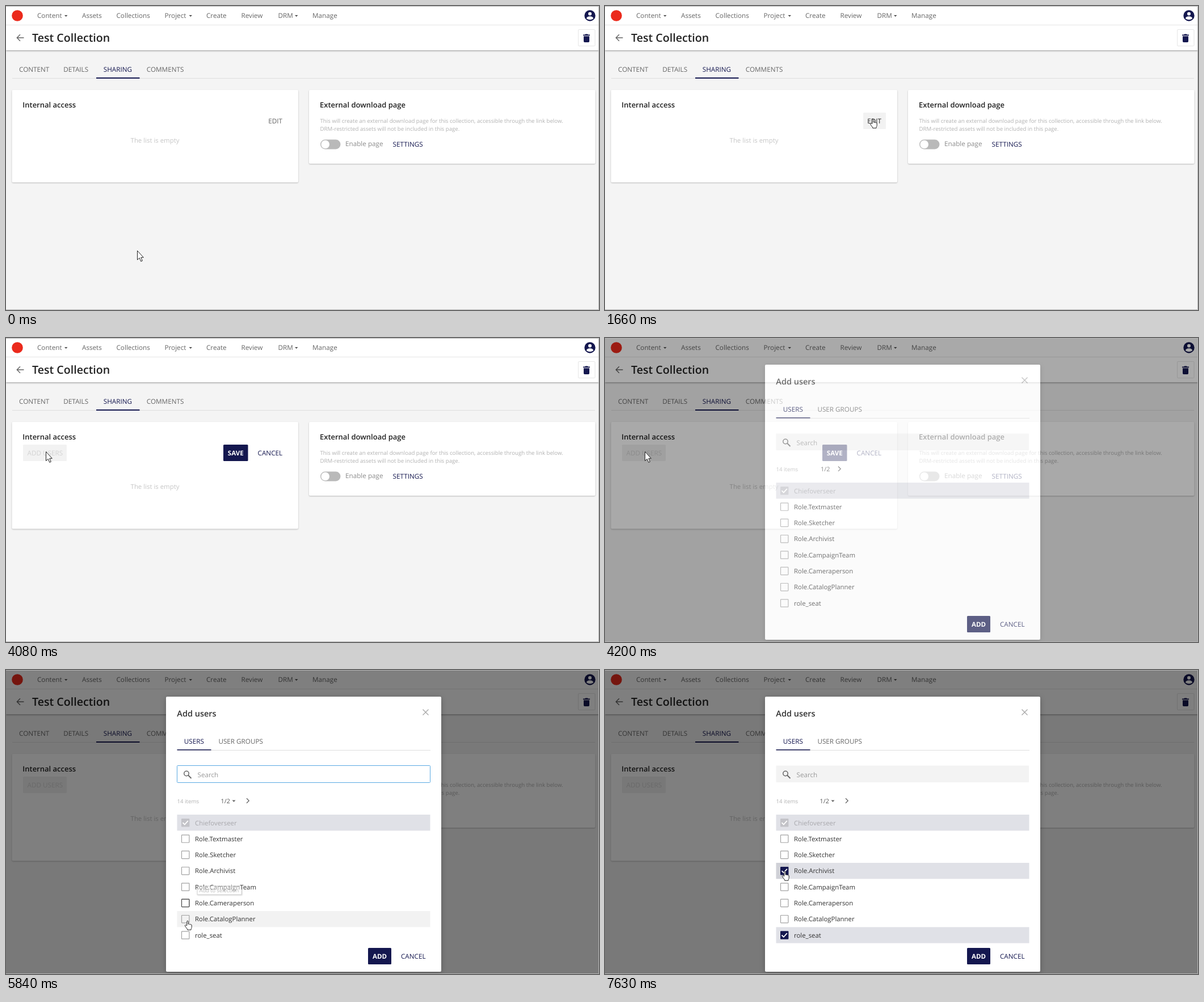
An HTML page that plays this animation: 1045x536 px, repeating every 8000 ms.

```html
<!DOCTYPE html>
<html lang="en">
<head>
<meta charset="utf-8">
<title>Collection sharing</title>
<style>
  html, body { margin: 0; width: 100%; height: 100%; overflow: hidden; background: #f4f4f4; }
  svg { display: block; width: 100vw; height: 100vh; }
  text { font: 400 11.4px "Open Sans", sans-serif; fill: #333; text-rendering: geometricPrecision; white-space: pre; }
  .label { font-size: 11.7px; font-weight: 500; fill: #666; }
  .title { font-size: 19.6px; font-weight: 600; fill: #222; }
  .head { font-size: 13px; font-weight: 600; fill: #222; }
  .modal-head { font-size: 14.5px; font-weight: 600; fill: #333; }
  .small { font-size: 9.7px; fill: #b2b2b2; }
  .faint { fill: #c6c6c6; }
  .navy { fill: #14174f; }
  .solid { font-size: 11.6px; font-weight: 700; fill: #fff; }
  .dark { fill: #222; }
  .off { fill: #d2d2d2; }
  .hover { fill: #f2f2f2; }
  .picked { fill: #e0e1e7; }
  .rule { stroke: #dedede; }
  .box { fill: none; stroke: #a2a2a2; stroke-width: 1.2; }
  .box.strong { stroke: #505050; }
  .tick { fill: none; stroke: #fff; stroke-width: 1.8; }
  .card { fill: #fff; filter: drop-shadow(0 1px 1.2px rgba(0,0,0,.24)); }
</style>
</head>
<body>
<svg viewBox="0 0 1045 536" preserveAspectRatio="none">
  <rect width="1045" height="536" fill="#f4f4f4"/>

  <!-- header -->
  <rect width="1045" height="78" fill="#fff" style="filter:drop-shadow(0 1px 1.5px rgba(0,0,0,.4))"/>
  <path d="M0 33.5H1045" stroke="#e6e6e6"/>
  <circle cx="20" cy="17" r="9.8" fill="#eb2a1c"/>
  <g id="nav"></g>
  <circle cx="1029" cy="17" r="9.7" class="navy"/>
  <circle cx="1029" cy="13.7" r="3" fill="#fff"/>
  <path d="M1023 22.2c0-5.4 12-5.4 12 0q-6 4-12 0z" fill="#fff"/>
  <path d="M31.5 56H19.5M25 50.3L19.3 56L25 61.7" fill="none" stroke="#666" stroke-width="1.4"/>
  <text class="title" x="46" y="63">Test Collection</text>
  <rect x="1008.5" y="41.5" width="29.5" height="29" rx="1.5" fill="#fff" stroke="#e6e6e6"/>
  <path class="navy" d="M1017 50.5h3.2l.8-1h4l.8 1h3.2v1.8h-12zM1018 53.3h10v9q0 1.7-1.7 1.7h-6.6q-1.7 0-1.7-1.7z"/>

  <!-- page tabs -->
  <path class="rule" d="M11 127.5H1038"/>
  <rect class="navy" x="159" y="126" width="76.5" height="2"/>
  <text class="label" x="23" y="116">CONTENT</text>
  <text class="label" x="101.3" y="116">DETAILS</text>
  <text class="label navy" x="171.8" y="116">SHARING</text>
  <text class="label" x="247.8" y="116">COMMENTS</text>

  <!-- internal access -->
  <g data-at="0-2130">
    <rect class="card" x="10.5" y="148" width="504.5" height="163" rx="2"/>
    <text class="faint" x="262.5" y="241" text-anchor="middle">The list is empty</text>
    <rect class="hover" x="455" y="188" width="40" height="29" rx="1.5" data-at="1360-2130"/>
    <text class="label" x="462.3" y="207" data-at="0-1360">EDIT</text>
    <text class="label dark" x="462.3" y="207" data-at="1360-2130">EDIT</text>
  </g>
  <g data-at="2130-8000">
    <rect class="card" x="10.5" y="148" width="504.5" height="188.5" rx="2"/>
    <text class="faint" x="262.5" y="266" text-anchor="middle">The list is empty</text>
    <rect class="hover" x="30" y="188" width="77" height="29" rx="1.5" data-at="3360-8000"/>
    <text class="label navy" x="37.6" y="207" data-at="2130-3930">ADD USERS</text>
    <text class="label off" x="37.6" y="207" data-at="3930-8000">ADD USERS</text>
    <rect class="navy" x="383" y="188" width="43.5" height="29" rx="1.5"/>
    <text class="solid" x="404.8" y="207" text-anchor="middle">SAVE</text>
    <rect class="hover" x="436" y="188" width="59" height="29" rx="1.5" data-at="2130-2800"/>
    <text class="label navy" x="443.6" y="207">CANCEL</text>
  </g>
  <text class="head" x="29.3" y="179">Internal access</text>

  <!-- external page -->
  <rect class="card" x="534" y="148" width="504.5" height="130" rx="2"/>
  <text class="head" x="553" y="179">External download page</text>
  <text class="small" x="553.5" y="206">This will create an external download page for this collection, accessible through the link below.</text>
  <text class="small" x="553.5" y="220">DRM-restricted assets will not be included in this page.</text>
  <rect x="554" y="235.5" width="35.5" height="17" rx="8.5" fill="#b9b9b9"/>
  <circle cx="562.7" cy="244" r="7.3" fill="#fff"/>
  <text class="label" x="598" y="247" style="fill:#8c8c8c">Enable page</text>
  <text class="label navy" x="681.6" y="248">SETTINGS</text>

  <!-- dialog -->
  <g id="dialog" data-at="4200-8000">
    <rect width="1045" height="536" opacity=".5"/>
    <rect x="282" y="47" width="485" height="485" rx="2" fill="#fff" style="filter:drop-shadow(0 2px 5px rgba(0,0,0,.25))"/>
    <text class="modal-head" x="301.3" y="82">Add users</text>
    <path d="M734.5 69.5l10 10m0-10l-10 10" stroke="#a6a6a6" stroke-width="1.3"/>
    <path class="rule" d="M302 141.5H748"/>
    <rect class="navy" x="301.5" y="140" width="60" height="1.5"/>
    <text class="label navy" x="313.8" y="130.2">USERS</text>
    <text class="label" x="374.4" y="130.2">USER GROUPS</text>

    <rect x="301.5" y="168.5" width="445.5" height="29.5" rx="1" fill="#f3f3f3" data-at="4200-4350,6540-8000"/>
    <rect x="301.5" y="168.5" width="446" height="30" rx="1" fill="#fff" stroke="#5aa9e2" data-at="4350-6540"/>
    <circle cx="318" cy="182.5" r="4.2" fill="none" stroke="#666" stroke-width="1.5"/>
    <path d="M321 185.5l5.5 5.5" stroke="#666" stroke-width="1.8"/>
    <text class="label" x="337.5" y="188.5" style="fill:#999;font-weight:400">Search</text>
    <path d="M339.5 176V192" stroke="#222" data-at="4350-4910,5300-5840,6390-6540"/>

    <text class="small" x="301.5" y="234.5">14 items</text>
    <g fill="none" stroke="#666" stroke-width="1.3" data-at="4200-4350">
      <text x="380" y="234.8" stroke="none" style="font-size:10.8px;fill:#555">1/2</text>
      <path d="M411 226.5l4.2 4.2l-4.2 4.2"/>
    </g>
    <g fill="none" stroke="#666" stroke-width="1.3" data-at="4350-8000">
      <text x="378.5" y="234.8" stroke="none" style="font-size:10.8px;fill:#555">1/2</text>
      <path d="M398.5 229.5h6l-3 3.2z" fill="#666" stroke="none"/>
      <path d="M424 226.3l4.2 4.2l-4.2 4.2"/>
    </g>
    <g id="rows"></g>
    <rect class="navy" x="638" y="490" width="41" height="29" rx="1.5"/>
    <text class="solid" x="658.5" y="509" text-anchor="middle">ADD</text>
    <text class="label navy" x="696" y="509">CANCEL</text>
    <g id="tips"></g>
  </g>

  <path d="M0 .5H1044.5V535.5H0" fill="none" stroke="#b4b4b4"/>

  <g id="cursor" fill="#fff" stroke="#222" stroke-linejoin="round">
    <path id="arrow" d="M.5 .5V16.5L4.2 13.2L6.8 19.3L9.3 18.2L6.8 12.3H11.3Z"/>
    <path id="hand" d="M-1.2 8.5V1.5a1.2 1.2 0 0 1 2.4 0V6.2c.4-.7 2-.6 2.2.3c.5-.6 1.9-.4 2 .5c.6-.4 1.8-.1 1.8 1v3.6c0 1.6-1.2 2.2-1.2 4.6h-6.2c0-1.8-1.6-2.8-2.6-4.4l-1.8-2.9c-.4-1 .9-1.8 1.7-1z"/>
  </g>
</svg>
<script>
const LOOP = 8000;
const $ = id => document.getElementById(id);

// label, x, x of the drop-down arrow
const nav = [["Content", 55, 103], ["Assets", 134], ["Collections", 194.5], ["Project", 279.5, 322.5],
  ["Create", 353], ["Review", 414.5], ["DRM", 479.5, 509], ["Manage", 540]];
$("nav").innerHTML = nav.map(([name, x, arrow]) =>
  `<text class="label" x="${x}" y="21">${name}</text>` +
  (arrow ? `<path d="M${arrow} 16h5.5l-2.75 3z" fill="#555"/>` : "")).join("");

// hover: row shading, strong: darker checkbox, pick: time of selection
const rows = [
  { name: "Chiefoverseer", locked: true },
  { name: "Role.Textmaster" },
  { name: "Role.Sketcher" },
  { name: "Role.Archivist", hover: "5300-5720,6940-7360", strong: "6940-7360", pick: 7360, pressed: true },
  { name: "Role.CampaignTeam", hover: "6810-6940" },
  { name: "Role.Cameraperson", hover: "5720-5840", strong: "5720-5960" },
  { name: "Role.CatalogPlanner", hover: "5840-6120,6670-6810", strong: "5960-6120" },
  { name: "role_seat", hover: "6120-6540", strong: "6120-6540", pick: 6540 }
];

const band = (cls, y, at) => `<rect class="${cls}" x="301.5" y="${y}" width="446" height="28.3" data-at="${at}"/>`;
const checked = (mid, fill) =>
  `<rect x="309" y="${mid - 7.2}" width="14.4" height="14.4" rx="1" fill="${fill}"/>` +
  `<path class="tick" d="M311.5 ${mid}l3.3 3.3l6-6.6"/>`;

function rowMarkup({ name, locked, hover, strong, pick, pressed }, i) {
  const y = 255 + i * 28.33, mid = y + 14.2;
  const box = cls => `<rect class="box ${cls}" x="309.5" y="${mid - 6.7}" width="13.4" height="13.4" rx=".8"`;
  let out = "";
  if (hover) out += band("hover", y, hover);
  if (locked) out += band("picked", y, `0-${LOOP}`) + checked(mid, "#c3c3c8");
  else out += box("") + "/>";
  if (strong) out += box("strong") + ` data-at="${strong}"/>`;
  if (pick) {
    const at = `${pick}-${LOOP}`;
    out += band("picked", y, at) + `<g data-at="${at}">`;
    if (pressed) out += `<rect x="301.5" y="${y}" width="22.5" height="28.3" opacity=".07"/>`;
    out += checked(mid, "#14174f") + "</g>";
  }
  return out + `<text x="333" y="${mid + 4.3}"${locked ? ' style="fill:#a8a8ac"' : ""}>${name}</text>`;
}
$("rows").innerHTML = rows.map(rowMarkup).join("");

// x, y, shown, fading, gone
const tips = [[337, 381, 5600, 5840, 5960], [317, 480, 6390, 6540, 6670], [317, 375, 7210, 7480, 7630]];
$("tips").innerHTML = tips.map(([x, y, from, , to]) =>
  `<g data-at="${from}-${to}"><rect x="${x}" y="${y}" width="78" height="15" fill="#fff" stroke="#999" ` +
  `style="filter:drop-shadow(1.5px 1.5px .8px rgba(0,0,0,.35))"/>` +
  `<text x="${x + 3.5}" y="${y + 10.8}" style="font-size:9.3px;fill:#666">Add to selection</text></g>`).join("");

// time, tip x, tip y, 1 for the hand
const moves = [
  [0, 231, 431], [550, 246, 500], [670, 264, 497], [820, 280, 468], [970, 357, 398], [1100, 410, 306],
  [1240, 452, 232], [1360, 456, 205, 1], [1510, 467, 201, 1], [1660, 472, 199, 1],
  [2800, 286, 254], [2930, 108, 283], [3080, 96, 250], [3200, 85, 229],
  [3360, 72, 201, 1], [3500, 70.5, 200, 1], [3930, 70, 200],
  [4910, 168, 262], [5030, 250, 318], [5180, 393, 330], [5300, 337, 360, 1],
  [5720, 321, 408, 1], [5840, 320, 442, 1], [5960, 320, 449, 1], [6120, 317, 460, 1],
  [6670, 318, 428, 1], [6810, 318, 385, 1], [6940, 318, 357, 1], [7090, 317, 355, 1]
];

const timed = [...document.querySelectorAll("[data-at]")].map(el =>
  ({ el, spans: el.dataset.at.split(",").map(span => span.split("-").map(Number)) }));
const start = performance.now();

function draw() {
  const t = (performance.now() - start) % LOOP;
  for (const { el, spans } of timed)
    el.style.display = spans.some(([from, to]) => t >= from && t < to) ? "" : "none";

  $("dialog").style.opacity = t < 4350 ? 0.67 : 1;
  tips.forEach(([, , , fade], i) => { $("tips").children[i].style.opacity = t < fade ? 1 : 0.45; });

  const [, x, y, hand] = moves.findLast(move => t >= move[0]);
  $("cursor").setAttribute("transform", `translate(${x} ${y})`);
  $("arrow").style.display = hand ? "none" : "";
  $("hand").style.display = hand ? "" : "none";
  requestAnimationFrame(draw);
}
draw();
</script>
</body>
</html>
```
